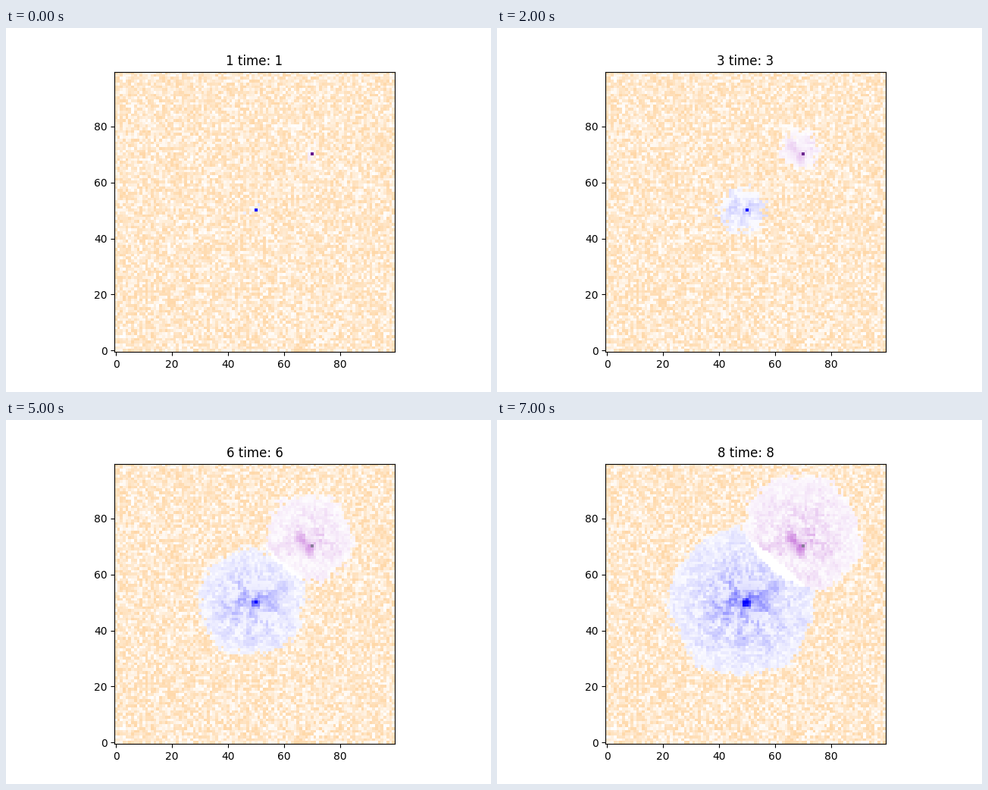
These frames come from a looping animation (640x480 px, 8 s). A matplotlib script:

```python
import numpy as np
import matplotlib.pyplot as plt
from matplotlib.animation import FuncAnimation
from matplotlib.colors import to_rgb

SIZE, STEPS = 100, 8
rng = np.random.default_rng(7)
Y, X = np.mgrid[0:SIZE, 0:SIZE].astype(float)

ORANGE, BLUE, ORCHID = (np.array(to_rgb(name)) for name in
                        ("darkorange", "blue", "mediumorchid"))
INDIGO, GRAY = np.array(to_rgb("#640c8c")), np.array(to_rgb("#877c98"))


def tint(color, amount):
    """Blend white towards a colour by a per-cell amount."""
    return 1 - amount[..., None] * (1 - color)


def soften(field):
    total = sum(np.roll(field, (dy, dx), (0, 1))
                for dy in (-1, 0, 1) for dx in (-1, 0, 1))
    return total / 9


def blob(x, y, width):
    return np.exp(-((X - x) ** 2 + (Y - y) ** 2) / (2 * width ** 2))


class Colony:
    """A patch that spreads at a steady speed and darkens with age."""

    def __init__(self, color, center, rise, start, speed, rate, core, power):
        self.color, self.center, self.rise = color, center, rise
        self.start, self.speed, self.rate = start, speed, rate
        self.core, self.power = core, power
        near = blob(*center, 7)
        self.jitter = rng.normal(0, 0.8, (SIZE, SIZE)) * (1 + 0.7 * near)
        self.phase = rng.uniform(0, 2 * np.pi)
        streak = soften(rng.uniform(-2.5, 2.5, (SIZE, SIZE)))
        grain = rng.uniform(0.35, 1.4, (SIZE, SIZE))
        self.grain = np.clip(grain + (0.5 + near) * streak, 0.2, 2)

    def age(self, t):
        """Steps since the front reached each cell; negative if not yet."""
        dx = X - self.center[0]
        dy = Y - self.center[1] - self.rise * (t - 1)
        wobble = 0.03 * np.sin(5 * np.arctan2(dy, dx) + self.phase)
        reach = np.hypot(dx, dy) * (1 + wobble) + self.jitter
        wait = np.maximum(reach - self.start, 0) / self.speed
        return t - 1 - wait

    def paint(self, grid, t, where):
        age = self.age(t)
        alive = (age >= 0) & where
        amount = (0.06 + self.rate * np.maximum(age, 0)) * self.grain
        amount = amount + self.core * ((t - 1) / 7) ** self.power
        grid[alive] = tint(self.color, np.clip(amount, 0, 1))[alive]
        return alive


blue = Colony(BLUE, (48.5, 49.9), 0, 1, 3.6, 0.023,
              blob(49.6, 49.9, 0.9) + 0.12 * blob(50, 51, 5), 2)
orchid = Colony(ORCHID, (69, 70.3), 0.5, 0.9, 2.95, 0.027,
                0.35 * blob(67, 70.5, 2) + 0.15 * blob(70, 70.5, 2), 0.8)

# Curved frontier between the colonies: distance across it and along it
ALONG = (X - 60) * 0.764 - (Y - 63) * 0.645
ACROSS = (X - 60) * 0.645 + (Y - 63) * 0.764 - 0.008 * ALONG ** 2
ground = tint(ORANGE, 0.34 * rng.uniform(0, 1, (SIZE, SIZE)) ** 0.85)


def render(t):
    grid = ground.copy()
    reached = blue.paint(grid, t, ACROSS < 0)
    reached |= orchid.paint(grid, t, ACROSS >= 0)
    gap = 0.65 * max(t - 5, 0) * (1 - (ALONG / 14) ** 2)
    grid[reached & (np.abs(ACROSS) < gap)] = 1
    grid[50, 50] = BLUE
    fade = min((t - 1) / 4, 1)
    grid[70, 70] = INDIGO + (GRAY - INDIGO) * fade ** 2
    return np.clip(grid, 0, 1)


fig, ax = plt.subplots(figsize=(6.4, 4.8), dpi=100)
image = ax.imshow(render(1), origin="lower", interpolation="nearest")
title = ax.set_title("1 time: 1")


def update(frame):
    t = frame + 1
    image.set_data(render(t))
    title.set_text(f"{t} time: {t}")
    return image, title


anim = FuncAnimation(fig, update, frames=STEPS, interval=1000,
                     init_func=lambda: update(0), repeat=True, repeat_delay=0)
plt.show()
```
